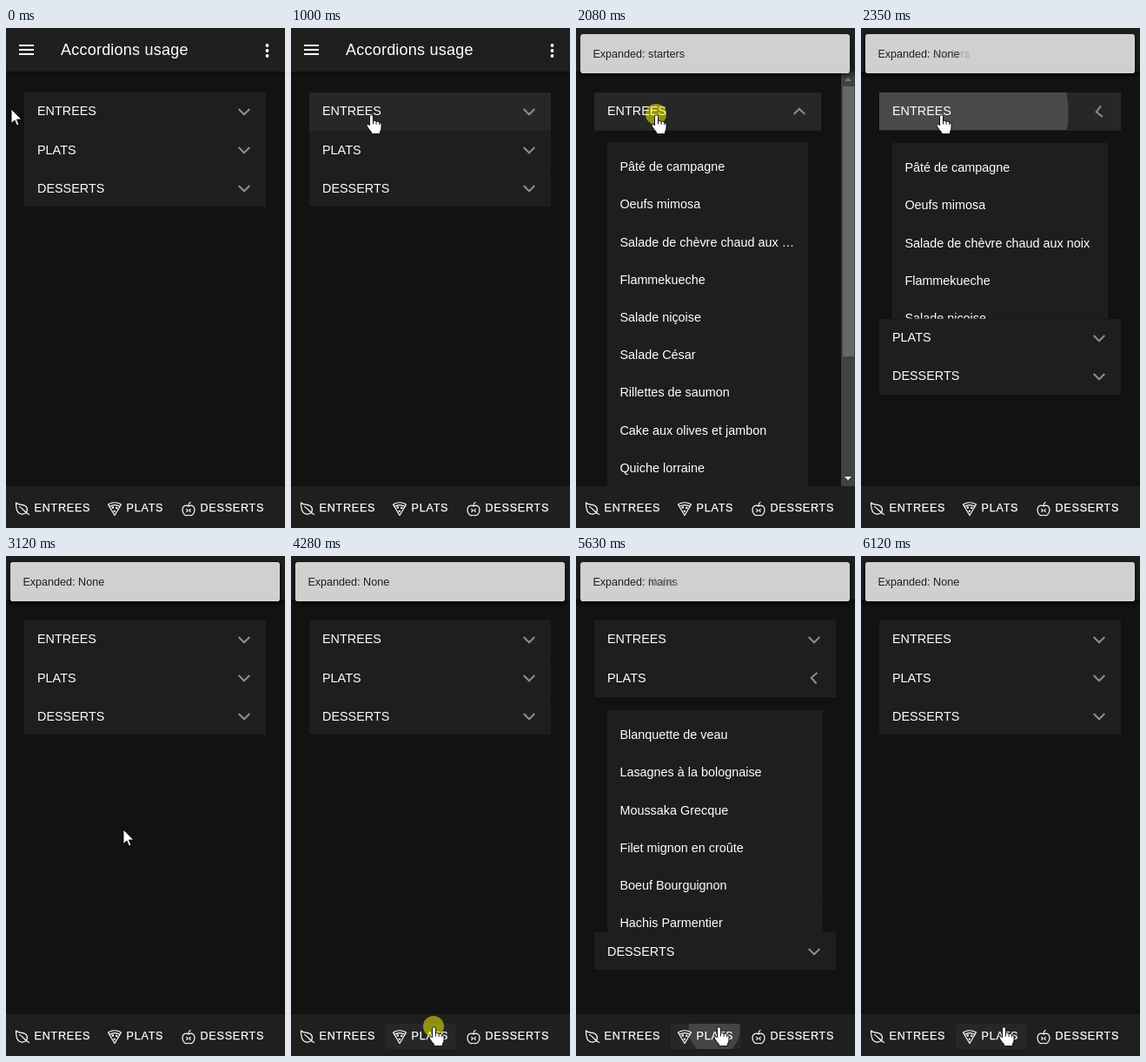
Recreate the animation shown at these times as an HTML page. Size 321 px wide and 574 px high, loop 6.51 s.

```html
<!DOCTYPE html>
<html lang="fr">
<head>
<meta charset="utf-8">
<title>Accordions usage</title>
<style>
  html, body { margin: 0; width: 100%; height: 100%; overflow: hidden; background: #121212; }
  svg { display: block; width: 321px; height: 574px; }
  text { font: 14.4px "Liberation Sans", Arial, sans-serif; fill: #fff; white-space: pre; }
  .title { font-size: 18px; letter-spacing: .225px; }
  .tab { font-size: 12.6px; letter-spacing: .756px; stroke: #fff; stroke-width: .25px; }
  .note { font-size: 12.6px; fill: #1e1e1e; }
  .icon { fill: none; stroke: #fff; stroke-width: 1.2; stroke-linecap: round; stroke-linejoin: round; }
</style>
</head>
<body>
<svg id="stage" viewBox="0 0 321 574" width="321" height="574">
  <defs>
    <linearGradient id="fade" x1="0" y1="0" x2="0" y2="1">
      <stop offset="0" stop-color="#000" stop-opacity=".35"/>
      <stop offset="1" stop-color="#000" stop-opacity="0"/>
    </linearGradient>
    <filter id="lift" x="-10%" y="-30%" width="120%" height="180%">
      <feDropShadow dx="0" dy="2" stdDeviation="3" flood-color="#000" flood-opacity=".5"/>
    </filter>
  </defs>
  <rect width="321" height="574" fill="#121212"/>
  <g id="content"></g>
  <g id="scroll">
    <rect x="305" y="50" width="16" height="476" fill="#424242"/>
    <rect id="thumb" x="307" y="67" width="13" fill="#686868"/>
    <path d="M309 61h8l-4-4z" fill="#7a7a7a"/>
    <path d="M309 515h8l-4 4z" fill="#fff"/>
  </g>
  <rect y="50" width="321" height="7" fill="url(#fade)"/>
  <rect width="321" height="50" fill="#1f1f1f"/>
  <path d="M15 20h17M15 25h17M15 30h17" stroke="#fff" stroke-width="1.8"/>
  <text class="title" x="63" y="31">Accordions usage</text>
  <g fill="#fff">
    <circle cx="300.5" cy="20" r="1.9"/><circle cx="300.5" cy="26" r="1.9"/><circle cx="300.5" cy="32" r="1.9"/>
  </g>
  <g id="footer">
    <rect y="526" width="321" height="48" fill="#1f1f1f"/>
    <g id="tabFx"></g>
    <g class="icon">
      <path d="M11.5 545C11.5 556 15 559.5 21.5 557.5C25 556 25.5 550.5 22 548.5C18 546.3 14.5 548 11.5 545ZM15.5 549.5C19 551 22 556.5 26.5 558.5"/>
      <path d="M117.5 547Q125 542.5 132.5 547L125 559.5ZM119 549.3Q125 546 131 549.3"/>
      <path d="M210 549C206 546.5 203 549.5 203 553C203 557 206 560.5 208.5 559.5Q210 559 211.5 559.5C214 560.5 217 557 217 553C217 549.5 214 546.5 210 549ZM210 548.5Q210 545.5 212 544.5"/>
      <path d="M207.8 552.3l1.4 1.5l-1.4 1.5M212.2 552.3l-1.4 1.5l1.4 1.5"/>
    </g>
    <g fill="#fff">
      <circle cx="122.8" cy="550.5" r="1.3"/><circle cx="127.3" cy="551" r="1.3"/><circle cx="124.8" cy="554.8" r="1.2"/>
    </g>
    <text class="tab" x="32.5" y="555">ENTREES</text>
    <text class="tab" x="138.5" y="555">PLATS</text>
    <text class="tab" x="223.5" y="555">DESSERTS</text>
  </g>
  <g id="toasts"></g>
  <circle id="press" r="12" fill="#ff0" fill-opacity=".5"/>
  <g id="cursor" stroke="#000" stroke-width=".9" stroke-linejoin="round">
    <path id="arrow" fill="#fff" d="M0 0V16.5L4 13L6.5 19L9 18L6.5 12H12Z"/>
    <g id="hand">
      <path fill="#fff" d="M-1.5 2.6Q-1.5 .8 .5 .8Q2.5 .8 2.5 2.6V8Q3 7 5 7.4Q6 7.8 6.1 8.6Q7.5 7.8 9 8.6Q9.6 9 9.7 9.8Q11.8 9.6 12 11.5V16Q12 18 10.5 20V22.6H.5V20.5Q-2 18 -4.5 14Q-5.5 12 -4 11.3Q-2.8 11 -1.5 13Z"/>
      <path fill="none" d="M2.5 8v3.5M6.1 8.8v3M9.7 9.8v2.5"/>
    </g>
  </g>
</svg>
<script>
const LOOP = 6510, STEP = 70, FULL = 517, ROW = 43.2;
const $ = id => document.getElementById(id);

function add(parent, tag, attrs = {}, text) {
  const el = document.createElementNS('http://www.w3.org/2000/svg', tag);
  set(el, attrs);
  if (text) el.textContent = text;
  parent.appendChild(el);
  return el;
}
function set(el, attrs) {
  for (const k in attrs) el.setAttribute(k, attrs[k]);
}
const show = (el, on) => el.setAttribute('visibility', on ? 'visible' : 'hidden');
const clamp = v => Math.min(1, Math.max(0, v));

function bezier(x1, y1, x2, y2) {
  const at = (a, b, u) => 3 * (1 - u) * (1 - u) * u * a + 3 * (1 - u) * u * u * b + u * u * u;
  return x => {
    if (x <= 0) return 0;
    if (x >= 1) return 1;
    let lo = 0, hi = 1;
    for (let i = 0; i < 24; i++) {
      const mid = (lo + hi) / 2;
      if (at(x1, x2, mid) < x) lo = mid; else hi = mid;
    }
    return at(y1, y2, lo);
  };
}
const slide = bezier(.25, .8, .5, 1);
const appear = bezier(.36, .66, .04, 1);
const spread = bezier(.4, 0, .2, 1);

// open / close: panel height, turn: chevron start times
const sections = [
  { name: 'ENTREES', open: 1190, close: 2278, turn: [1000, 2285], ripples: [1080, 2268],
    dishes: ['Pâté de campagne', 'Oeufs mimosa', 'Salade de chèvre chaud aux noix', 'Flammekueche',
      'Salade niçoise', 'Salade César', 'Rillettes de saumon', 'Cake aux olives et jambon', 'Quiche lorraine'] },
  { name: 'PLATS', open: 4500, close: 5575, turn: [4490, 5575], ripples: [],
    dishes: ['Blanquette de veau', 'Lasagnes à la bolognaise', 'Moussaka Grecque', 'Filet mignon en croûte',
      'Boeuf Bourguignon', 'Hachis Parmentier', 'Gratin Dauphinois', 'Chili con carne'] },
  { name: 'DESSERTS', open: LOOP, close: LOOP, turn: [LOOP, LOOP], ripples: [], dishes: [] }
];
const notes = [[1100, 'starters'], [2240, 'None'], [4440, 'mains'], [5580, 'None']];
const presses = [[870, 1000], [2080, 2280], [4280, 4410], [5430, 5560]];
const tabRipples = [4420, 5565];
const path = [[190, 6, 93], [610, 92, 99], [2770, 92, 99], [2910, 100, 140], [2980, 112, 195],
  [3120, 135, 314], [3260, 137, 400], [3610, 123, 526], [3890, 164, 540]];
const ticks = [0, 260, 870, 1000, 2080, 2280, 4280, 4410, 5430, 5560];

// A surface with hover tint and a clipped ripple
function surface(parent, id) {
  const clip = add(add(parent, 'clipPath', { id }), 'rect');
  const base = add(parent, 'rect');
  const wave = add(parent, 'circle', { fill: '#fff', 'clip-path': `url(#${id})` });
  return (box, hover, idle, starts, t, from) => {
    set(clip, box);
    set(base, box);
    base.setAttribute('fill', hover ? '#272727' : idle);
    const start = starts.filter(s => s <= t).pop();
    const age = start === undefined ? Infinity : t - start;
    show(wave, age < 375);
    if (age >= 375) return;
    const p = spread(age / 225), size = Math.max(box.width, box.height) / 4;
    const end = (Math.hypot(box.width, box.height) + 10) / 2;
    set(wave, {
      cx: from[0] + (box.x + box.width / 2 - from[0]) * p,
      cy: from[1] + (box.y + box.height / 2 - from[1]) * p,
      r: size + (end - size) * p,
      'fill-opacity': .16 * clamp(age / 75) * clamp((375 - age) / 150)
    });
  };
}

const content = $('content');
sections.forEach((s, i) => {
  s.clip = add(add(content, 'clipPath', { id: 'panel' + i }), 'rect', { x: 0, width: 321 });
  s.panel = add(content, 'g', { 'clip-path': `url(#panel${i})` });
  s.list = add(s.panel, 'rect', { x: 36, height: FULL - 29, fill: '#1e1e1e' });
  s.rows = s.dishes.map(d => ({
    text: add(s.panel, 'text', { x: 50.4 }, d),
    line: add(s.panel, 'rect', { x: 50, height: 1, fill: '#222' })
  }));
});
sections.forEach((s, i) => {
  s.head = add(content, 'g');
  s.line = add(s.head, 'rect', { x: 21, height: 1, fill: i < 2 ? '#222' : 'none' });
  s.paint = surface(s.head, 'head' + i);
  s.label = add(s.head, 'text', { x: 36 }, s.name);
  s.chevron = add(s.head, 'path', { d: 'M-6.3 -3L0 3.3L6.3 -3', fill: 'none', stroke: '#8e8e8e', 'stroke-width': 2 });
});
const paintTab = surface($('tabFx'), 'tabClip');
const toasts = [0, 1].map(() => {
  const g = add($('toasts'), 'g');
  add(g, 'rect', { x: 5, y: 7, width: 310, height: 45, rx: 3.6, fill: '#d0d0d0', filter: 'url(#lift)' });
  return { g, text: add(g, 'text', { class: 'note', x: 19.4, y: 34 }) };
});

const openness = (t, a, b) => t < b ? slide((t - a) / 300) : 1 - slide((t - b) / 300);

// The screen refreshes in steps
function snap(t) {
  const start = ticks.filter(s => s <= t).pop();
  return start + Math.floor((t - start) / STEP) * STEP;
}

function pointer(t) {
  const n = path.findIndex(k => k[0] > t);
  if (n === 0) return path[0].slice(1);
  if (n < 0) return path[path.length - 1].slice(1);
  const [t0, x0, y0] = path[n - 1], [t1, x1, y1] = path[n], p = (t - t0) / (t1 - t0);
  return [Math.round(x0 + (x1 - x0) * p), Math.round(y0 + (y1 - y0) * p)];
}

function drawSections(t, at) {
  const heights = sections.map(s => FULL * openness(t, s.open, s.close));
  const total = heights.reduce((a, b) => a + b);
  const long = 160 + total > 475, width = long ? 261 : 278;
  let shift = 0, over = false;
  sections.forEach((s, i) => {
    const y = Math.round(74 + 44.1 * i + shift), h = heights[i];
    const hover = at[0] >= 21 && at[0] < 21 + width && at[1] >= y && at[1] < y + 43;
    over = over || hover;
    s.paint({ x: 21, y, width, height: 43 }, hover, '#1e1e1e', s.ripples, t, [92, 99]);
    set(s.line, { y: y + 43, width });
    s.label.setAttribute('y', Math.round(74 + 44.1 * i + 26.4 + shift));
    const turn = 180 * openness(t, ...s.turn);
    s.chevron.setAttribute('transform', `translate(${width - 4} ${y + 22}) rotate(${turn})`);

    show(s.panel, h > 0);
    if (h > 0) {
      const top = 131 + 45 * i + (long ? 0 : 1);
      set(s.clip, { y: y + 43, height: h + 1 });
      set(s.list, { y: top, width: width - 30 });
      s.rows.forEach((row, k) => {
        row.text.setAttribute('y', Math.round(top + 33.2 + ROW * k));
        set(row.line, { y: Math.round(top + 7 + ROW * (k + 1)), width: width - 44 });
        if (s.dishes[k].length > 28) row.text.textContent = long ? s.dishes[k].slice(0, -4) + '…' : s.dishes[k];
      });
    }
    shift += h;
  });
  show($('scroll'), long);
  $('thumb').setAttribute('height', 442 * 475 / (160 + Math.max(total, 315)));
  return over;
}

function drawToasts(t) {
  const past = notes.filter(n => n[0] <= t), last = past.length - 1;
  toasts.forEach(({ g, text }, k) => {
    const note = past[last - 1 + k];
    show(g, note);
    if (!note) return;
    text.textContent = 'Expanded: ' + note[1];
    g.setAttribute('opacity', appear((t - note[0]) / 400));
  });
}

function draw(now) {
  const t = snap(now % LOOP), at = pointer(t);
  const overRow = drawSections(t, at);
  const overTab = at[0] >= 109 && at[0] < 190 && at[1] >= 537;
  paintTab({ x: 109, y: 537, width: 81, height: 29, rx: 2 }, overTab, '#1f1f1f', tabRipples, t, [164, 540]);
  drawToasts(t);
  set($('press'), { cx: at[0], cy: at[1] });
  show($('press'), presses.some(([a, b]) => t >= a && t < b));
  $('cursor').setAttribute('transform', `translate(${at[0]} ${at[1]})`);
  show($('hand'), overRow || overTab);
  show($('arrow'), !overRow && !overTab);
}

const begin = performance.now();
function frame() {
  draw(performance.now() - begin);
  requestAnimationFrame(frame);
}
frame();
</script>
</body>
</html>
```
